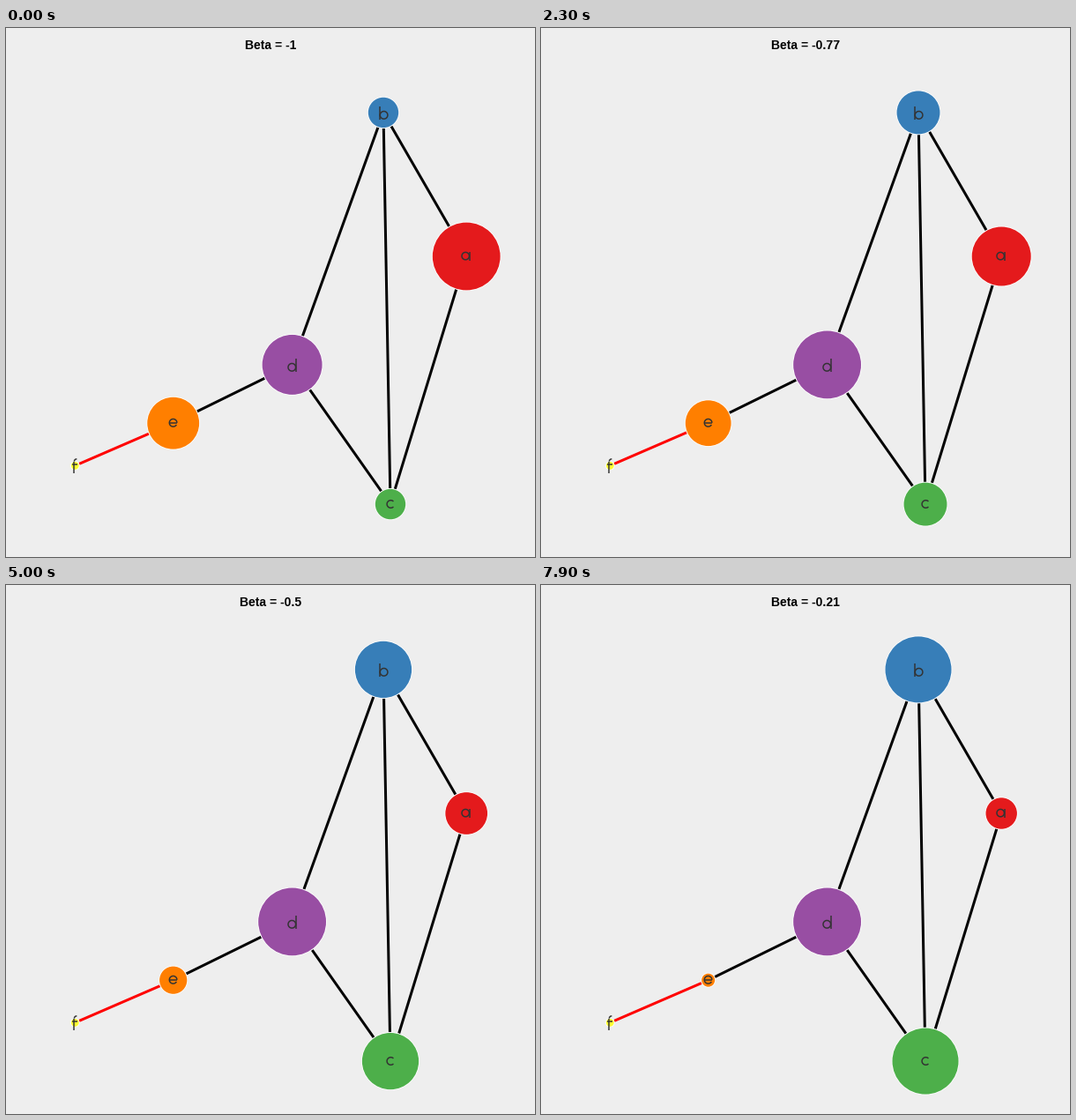
Animation, 600 px wide and 600 px high, one loop 8 s. Source, as a matplotlib script:

```python
import numpy as np
import matplotlib.pyplot as plt
from matplotlib.animation import FuncAnimation
from matplotlib.patches import Arc, Circle

FRAMES, INTERVAL = 80, 100
PX = 0.72  # points per pixel at 100 dpi
R_MIN, R_MAX = 4.4, 38.4
GAP = 0.8
INK = "#333333"

NODES = {
    "a": (522.2, 259.0, "#E41A1C"),
    "b": (428.0, 95.9, "#377EB8"),
    "c": (436.0, 540.1, "#4DAF4A"),
    "d": (324.6, 381.9, "#984EA3"),
    "e": (189.7, 448.2, "#FF7F00"),
    "f": (78.3, 496.4, "#FFFF33"),
}
EDGES = ["ab", "ac", "bc", "bd", "cd", "de", "ef"]

# Centrality relative to node d, as smooth curves over beta
BETAS = [-1, -0.88, -0.77, -0.6, -0.5, -0.4, -0.21]
RADII = {
    "a": [43.5, 38.25, 33.5, 27.0, 23.8, 21.3, 17.7],
    "b": [19.1, 21.6, 24.5, 29.3, 32.1, 34.6, 37.5],
    "e": [33.2, 29.6, 26.0, 19.4, 15.5, 12.2, 7.5],
}
CURVES = {
    k: np.polyfit(BETAS, (np.array(r) - R_MIN) / (R_MAX - R_MIN), 4)
    for k, r in RADII.items()
}


def radii(beta):
    score = {k: np.polyval(p, beta) for k, p in CURVES.items()}
    score.update(c=score["b"], d=1.0, f=0.0)
    top = max(score.values())
    return {k: R_MIN + (R_MAX - R_MIN) * s / top for k, s in score.items()}


fig = plt.figure(figsize=(6, 6), dpi=100, facecolor="#EEEEEE")
ax = fig.add_axes([0, 0, 1, 1])
ax.set(xlim=(0, 600), ylim=(600, 0))
ax.axis("off")


def stroke(xs, ys):
    ax.plot(xs, ys, color=INK, lw=1.5 * PX, solid_capstyle="butt", zorder=5)


def arc(x, y, r, start=0, end=360):
    ax.add_patch(Arc((x, y), 2 * r, 2 * r, theta1=start, theta2=end,
                     color=INK, lw=1.5 * PX, zorder=5))


def draw_labels():
    arc(521.2, 258.6, 4.2)
    stroke([525.5] * 2, [253.8, 263.6])
    arc(428.6, 98.8, 4.3)
    stroke([424.2] * 2, [88.5, 103.8])
    arc(436.4, 540.0, 4.3, 45, 315)
    arc(324.3, 384.8, 4.3)
    stroke([328.7] * 2, [374.5, 389.8])
    arc(189.6, 447.8, 4.3, 30, 360)
    stroke([185.3, 194.4], [447.8, 447.8])
    stroke([77.4] * 2, [491.6, 504.5])
    arc(80.1, 491.6, 2.7, 180, 275)
    stroke([75.2, 80.6], [495.0, 495.0])


lines = {
    e: ax.plot([], [], color="red" if e == "ef" else "black", lw=3 * PX,
               solid_capstyle="butt", zorder=1)[0]
    for e in EDGES
}
rings, discs = {}, {}
for name, (x, y, color) in NODES.items():
    rings[name] = ax.add_patch(Circle((x, y), 1, fc="white", lw=0, zorder=2))
    discs[name] = ax.add_patch(Circle((x, y), 1, fc=color, lw=0, zorder=3))
draw_labels()
title = ax.text(300, 24, "", ha="center", va="baseline", color="black",
                family="Liberation Sans", weight="bold", size=14 * PX)


def update(i):
    beta = round(-1 + i / 100, 2)
    size = radii(beta)
    title.set_text(f"Beta = {beta:g}")
    for k, r in size.items():
        discs[k].set_radius(r)
        rings[k].set_radius(r + GAP)
    for (u, v), line in lines.items():
        p, q = np.array(NODES[u][:2]), np.array(NODES[v][:2])
        step = (q - p) / np.hypot(*(q - p))
        p, q = p + step * (size[u] + GAP), q - step * (size[v] + GAP)
        line.set_data([p[0], q[0]], [p[1], q[1]])
    return [title, *lines.values(), *rings.values(), *discs.values()]


anim = FuncAnimation(fig, update, frames=FRAMES, interval=INTERVAL,
                     repeat=True, repeat_delay=0, blit=False)
plt.show()
```
